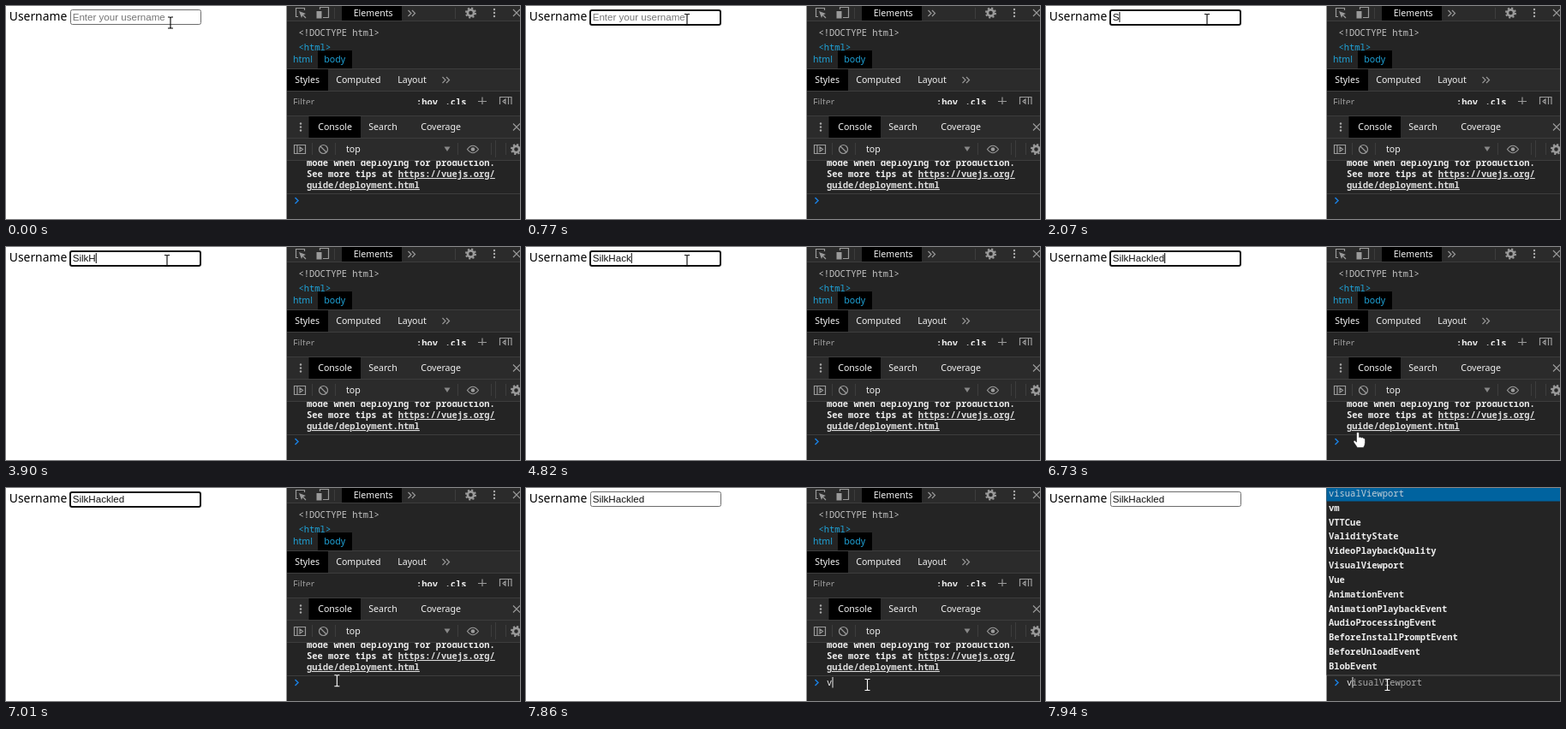
Animation, 600 px wide and 249 px high, one loop 8 s. Source, as an HTML page:

```html
<!DOCTYPE html>
<html lang="en">
<head>
<meta charset="utf-8">
<title>Typing a username</title>
<style>
  html, body { margin: 0; width: 100%; height: 100%; overflow: hidden; background: #fff; }
  svg { display: block; }
  text { white-space: pre; }
  .page { font: 13.86px "Noto Sans", sans-serif; }
  .field { font: 11.58px "Liberation Sans", Arial, sans-serif; }
  .ui { font: 10.6px "Noto Sans", sans-serif; fill: #f2f2f2; }
  .mono { font: 10.48px "Noto Sans Mono", monospace; fill: #eee; }
  .bold { font-weight: 600; }
  .link { text-decoration: underline; fill: #ddd; }
  .ui .crumb, .mono .tag { fill: #1fa3d8; }
  .ui .dim { fill: #999; }
  .mono .doctype { fill: #c4c4c4; }
  .icon { fill: none; stroke: #9a9a9a; stroke-width: 1.2; }
  .rule { stroke: #3d3d3d; }
</style>
</head>
<body>
<svg width="600" height="249" viewBox="0 0 600 249">
  <defs>
    <g id="gear" class="icon">
      <circle r="3.6" stroke-width="2.6"/>
      <circle r="5.5" stroke-width="2" stroke-dasharray="2.1 2.22"/>
    </g>
    <g id="dots" fill="#aaa">
      <circle cy="-4" r="1.2"/><circle r="1.2"/><circle cy="4" r="1.2"/>
    </g>
    <path id="close" class="icon" d="M-4-4 4 4M4-4-4 4"/>
    <path id="more" class="icon" d="M-4-3.5-.5 0-4 3.5M.5-3.5 4 0 .5 3.5"/>
    <clipPath id="treeClip"><rect x="328" y="18" width="272" height="34"/></clipPath>
    <clipPath id="filterClip"><rect x="328" y="99" width="272" height="16"/></clipPath>
    <clipPath id="logClip"><rect x="328" y="181" width="272" height="68"/></clipPath>
  </defs>

  <text class="page" x="3.8" y="17.3">Username</text>
  <rect id="box" fill="#fff" rx="2"/>
  <text id="value" class="field" x="77.7" y="17"></text>
  <rect id="caret" y="7" width="1" height="12"/>

  <rect x="327.5" width="272.5" height="249" fill="#242424"/>
  <g fill="#2b2b2b">
    <rect x="328" width="272" height="17"/>
    <rect x="328" y="73" width="272" height="26"/>
    <rect x="328" y="129" width="272" height="51"/>
  </g>
  <g fill="#000">
    <rect x="392" width="70" height="17"/>
    <rect x="364" y="52" width="40" height="21"/>
    <rect x="328" y="73" width="48" height="26"/>
    <rect x="353.5" y="129" width="60.5" height="25"/>
  </g>
  <path class="rule" d="M328 17.5H600M328 73.5H600M328 99.5H600M328 128.5H600M328 154.5H600M328 180.5H600M328 219.5H600M383.5 2V15M524.5 2V15M357.5 160V174M384.5 160V174M527.5 160V174M566.5 160V174M571.5 157V177M583.5 160V174"/>

  <g class="ui">
    <text x="405.7" y="12">Elements</text>
    <text class="crumb" x="335" y="66">html</text>
    <text class="crumb" x="371.3" y="66">body</text>
    <text x="337.2" y="90">Styles</text>
    <text x="385.2" y="90">Computed</text>
    <text x="457.2" y="90">Layout</text>
    <text x="364.2" y="145">Console</text>
    <text x="423.2" y="145">Search</text>
    <text x="484.2" y="145">Coverage</text>
    <text x="397" y="171">top</text>
  </g>
  <g clip-path="url(#treeClip)" class="mono">
    <text class="doctype" x="341.5" y="35">&lt;!DOCTYPE html&gt;</text>
    <text class="tag" x="341.5" y="51.5">&lt;html&gt;</text>
  </g>
  <g clip-path="url(#filterClip)">
    <g class="ui"><text class="dim" x="335" y="116">Filter</text></g>
    <text class="mono bold" x="479" y="115.5">:hov</text>
    <text class="mono bold" x="512.5" y="115.5">.cls</text>
    <path class="icon" d="M551 111.5H561M556 106.5V116.5M576.5 106.5H590V117H576.5ZM586.5 106V117M583 109 580 111.5 583 114Z"/>
  </g>

  <path class="icon" d="M341 12.5H338.5V2.5H348.5V5M346 10 350 14M366.5 4V1.5H376.5V13.5H370"/>
  <path fill="#9a9a9a" d="M342 6 350 9 346.5 10.5 345 14ZM362.5 6H368.5V14.5H362.5Z"/>
  <path class="icon" d="M336.5 162.5H349.5V172.5H336.5ZM340 162V173M343 165 346.5 167.5 343 170Z"/>
  <g class="icon"><circle cx="370.5" cy="167.5" r="5"/><path d="M367 164 374 171"/></g>
  <path d="M511.5 164.5H518.5L515 170Z" fill="#888"/>
  <path class="icon" d="M538.5 167.5Q545 159 551.5 167.5Q545 176 538.5 167.5Z"/>
  <circle cx="545" cy="167.5" r="2.3" fill="#9a9a9a"/>
  <use href="#more" x="473.5" y="8.5"/><use href="#more" x="513.5" y="86.5"/>
  <use href="#gear" x="542.5" y="8"/><use href="#gear" x="595.5" y="167.5"/>
  <use href="#dots" x="570" y="8"/><use href="#dots" x="344" y="141.5"/>
  <use href="#close" x="596" y="8"/><use href="#close" x="596" y="141.5"/>

  <g clip-path="url(#logClip)" class="mono bold">
    <text x="351" y="187">mode when deploying for production.</text>
    <text x="351" y="200">See more tips at <tspan class="link">https://vuejs.org/</tspan></text>
    <text x="351" y="213" class="link">guide/deployment.html</text>
  </g>
  <path d="M337.5 224 341 227.5 337.5 231" fill="none" stroke="#1a7fe0" stroke-width="1.5"/>
  <text id="typed" class="mono" x="351" y="231">v<tspan id="hint" fill="#aaa">isualViewport</tspan></text>
  <rect id="promptCaret" y="221" width="1" height="12.5" fill="#eee"/>

  <g id="popup" class="mono bold">
    <rect x="327.5" width="272.5" height="218" fill="#242424"/>
    <rect x="327.5" width="272.5" height="15.5" fill="#00639f"/>
    <path class="rule" d="M327.5 218.5H600"/>
  </g>

  <path id="beam" fill="none" stroke-width="1.1" d="M-3-6.5H-1Q0-6.5 0-5.5Q0-6.5 1-6.5H3M0-5.5V5.5M-3 6.5H-1Q0 6.5 0 5.5Q0 6.5 1 6.5H3"/>
  <path id="arrow" fill="#fff" stroke="#000" stroke-width=".8" d="M0 0V14L3.2 11 5.4 16 7.5 15 5.3 10.2H9.7Z"/>
  <path id="hand" fill="#fff" stroke="#222" stroke-width=".6" d="M-1.5 1Q0-1 1.5 1V6Q3 5 4 6.5Q5.5 5.5 6.5 7Q8 6.5 8.5 8.5V12Q8.5 15 6.5 18H-.5Q-2.5 15-5 11.5Q-5.5 9.5-3.5 9.8L-1.5 11.5Z"/>
</svg>
<script>
const $ = id => document.getElementById(id);
const LOOP = 8000, FOCUS = 220, BLUR = 7020, FIRST_KEY = 7860, POPUP = 7940;
const NAME = "SilkHackled";
const keyTimes = [2070, 2530, 2820, 2980, 3900, 4360, 4590, 4820, 5130, 5290, 5350];
// Each caret starts hidden and switches at these times.
const caretFlips = [FOCUS, 770, 1310, 1760, 2070, 3520, 3900, 5890, 6430, 6950];
const promptFlips = [BLUR, 7550, FIRST_KEY];

const items = ["visualViewport", "vm", "VTTCue", "ValidityState", "VideoPlaybackQuality",
  "VisualViewport", "Vue", "AnimationEvent", "AnimationPlaybackEvent", "AudioProcessingEvent",
  "BeforeInstallPromptEvent", "BeforeUnloadEvent", "BlobEvent"];
$("popup").insertAdjacentHTML("beforeend", items.map((item, i) => {
  const style = i ? "" : "fill:#c3cfd8;font-weight:400";
  const label = i ? item.replace(/^v/i, "<tspan font-weight='800'>$&</tspan>") : item;
  return `<text x="330" y="${10 + i * 16.82}" style="${style}">${label}</text>`;
}).join(""));

const show = (id, on) => $(id).style.display = on ? "" : "none";
const set = (id, attrs) => { for (const k in attrs) $(id).setAttribute(k, attrs[k]); };
const passed = (times, t) => times.filter(time => time <= t).length;
const mix = (a, b, p) => a + (b - a) * p;
const smooth = p => p * p * (3 - 2 * p);

// The pointer crosses the page in visible jumps, then settles on the prompt.
function pointerAt(t) {
  if (t < 80) return [192, 19.5];
  if (t < 6350) return [188, 16];
  const step = Math.min(10, Math.floor((t - 6350) / 74));
  if (step <= 5) {
    const p = smooth((step + 1) / 6);
    return [mix(188, 364, p), mix(16, 216.5, p)];
  }
  const p = smooth((step - 5) / 5);
  return [mix(364, 398.5, p), mix(216.5, 230, p)];
}

function pointerShape(x, y) {
  if (x > 351 && x < 483 && y > 203 && y < 217) return "hand";
  const overField = x > 75 && x < 228 && y > 4 && y < 23;
  return overField || (x > 350 && y > 181) ? "beam" : "arrow";
}

function draw(now) {
  const t = now % LOOP;
  const focused = t >= FOCUS && t < BLUR;
  set("box", focused
    ? { x: 75, y: 5, width: 152, height: 17, stroke: "#101010", "stroke-width": 2 }
    : { x: 75.5, y: 4.5, width: 152, height: 17, stroke: "#6c6c6c", "stroke-width": 1 });

  const text = NAME.slice(0, passed(keyTimes, t));
  $("value").textContent = text || "Enter your username";
  set("value", { fill: text ? "#111" : "#757575" });
  show("caret", passed(caretFlips, t) % 2);
  set("caret", { x: text ? 77.7 + $("value").getComputedTextLength() : 78 });

  show("typed", t >= FIRST_KEY);
  show("hint", t >= POPUP);
  show("popup", t >= POPUP);
  show("promptCaret", passed(promptFlips, t) % 2);
  set("promptCaret", { x: t < FIRST_KEY ? 351.5 : 357.5 });

  const [x, y] = pointerAt(t), shape = pointerShape(x, y);
  for (const id of ["beam", "arrow", "hand"]) show(id, id === shape);
  set(shape, { transform: `translate(${x} ${y})` });
  set("beam", { stroke: x > 328 ? "#fff" : "#000" });
  requestAnimationFrame(() => draw(performance.now()));
}
draw(0);
</script>
</body>
</html>
```
